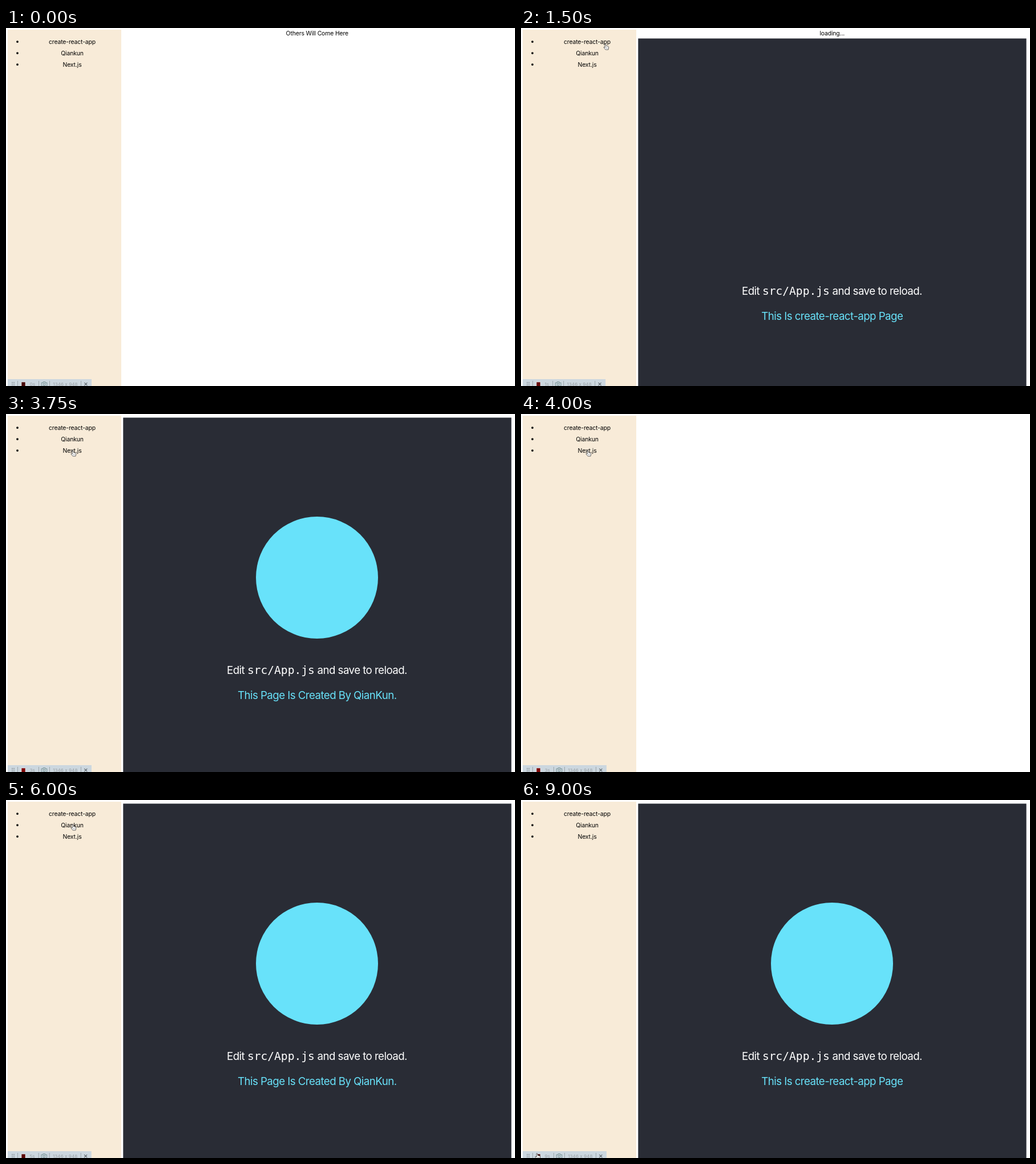
An HTML page that plays this animation: 892 by 628 pixels, repeating every 9250 ms.

```html
<!DOCTYPE html>
<html lang="en">
<head>
<meta charset="utf-8">
<title>Micro frontends</title>
<style>
  html, body { margin: 0; width: 100%; height: 100%; overflow: hidden; background: #fff; }
  svg { display: block; width: 892px; height: 628px; }
  text { font: 10.4px Inter, sans-serif; letter-spacing: -.012em; }
  .mid { text-anchor: middle; }
  .big { font-size: 18.7px; letter-spacing: -.55px; fill: #fff; }
  .code { font: 19.6px "DejaVu Sans Mono", monospace; letter-spacing: 0; }
  #link, #logo { fill: #68e2fa; }
  #bar text { font-size: 8.2px; letter-spacing: 0; fill: #9ba2a7; }
  .rule { stroke: #8f989e; stroke-width: .8; }
</style>
</head>
<body>
<svg viewBox="0 0 892 628">
  <rect x="3" y="3" width="199" height="625" fill="#f8ebd8"/>
  <g id="menu"></g>
  <text id="status" class="mid" x="545.3" y="13.3"></text>

  <g id="page">
    <rect x="205.3" y="6.4" width="680.3" height="630" fill="#292c35"/>
    <circle id="logo" cx="545" cy="287" r="107"/>
    <text class="big mid" x="545" y="456">Edit <tspan class="code">src/App.js</tspan> and save to reload.</text>
    <text id="link" class="big mid" x="545.2" y="499.6"></text>
  </g>

  <g id="bar">
    <rect id="back" x="3" y="616" width="147" height="12" fill="#ccd7df"/>
    <path d="M11 621v8M14 621v8" stroke="#777f85" stroke-width="1.4" stroke-dasharray="1.4 1.6"/>
    <path class="rule" d="M20.5 619v9"/>
    <rect id="rec" x="27" y="621" width="7" height="8" stroke="#eef1f3" stroke-width=".6"/>
    <text id="count" x="41.5" y="627.5">0s</text>
    <g id="tools">
      <path class="rule" d="M57.5 619v9M76.5 619v9M131.5 619v9"/>
      <g fill="none" stroke="#869fa3" stroke-width="1.2">
        <path d="M62.2 628v-5.6h2.3l1-1.7h3l1 1.7h2.3v5.6z"/>
        <circle cx="67" cy="625" r="1.9"/>
      </g>
      <text x="82.3" y="627.5">1346 x 948</text>
      <path d="M137.4 622.2l5 5m0-5l-5 5" stroke="#5d656b" stroke-width="1.2"/>
    </g>
  </g>

  <g id="hand">
    <path d="M-2-4.8q1-1 1.8.2L.3-1.4l3.3.6q1.2.3 1.1 1.6L4 5H-.8L-4 1.2q-.3-1.2 1-.9l1.4 1z"
      fill="#fff" stroke="#3a3a3a" stroke-width=".8" stroke-linejoin="round"/>
    <path d="M.5.8v2.4M2.2.9v2.3" stroke="#555" stroke-width=".5"/>
  </g>
</svg>
<script>
const LOOP = 9250, STEP = 250, TRAVEL = 1000;
const $ = id => document.getElementById(id);

$('menu').innerHTML = ['create-react-app', 'Qiankun', 'Next.js'].map((name, i) =>
  `<circle cx="20" cy="${24.1 + i * 20}" r="1.9"/>
   <text class="mid" x="116" y="${27.8 + i * 20}">${name}</text>`).join('');

const CRA = 'This Is create-react-app Page';
const QIANKUN = 'This Page Is Created By QianKun.';

// What the app shows from each time on; without a link the page is blank.
const scenes = [
  { from: 0, status: 'Others Will Come Here' },
  { from: 1000, status: 'loading...' },
  { from: 1500, status: 'loading...', link: CRA },
  { from: 1750, link: CRA },
  { from: 2750, link: QIANKUN },
  { from: 4000 },
  { from: 6000, link: QIANKUN },
  { from: 7250, link: CRA }
];

// The pointer rests at each stop and travels to it just before it arrives.
const stops = [
  { at: 0, x: 29, y: 625 },
  { at: 1000, x: 149, y: 33 },
  { at: 2500, x: 131, y: 54 },
  { at: 3750, x: 118, y: 69 },
  { at: 5750, x: 118, y: 48 },
  { at: 7000, x: 121, y: 31 },
  { at: 9000, x: 29, y: 625 }
];
const ease = p => p * p * (3 - 2 * p);

function pointer(t) {
  const i = stops.findLastIndex(s => s.at <= t);
  const a = stops[i], b = stops[i + 1] || a;
  const p = ease(Math.max(0, 1 - (b.at - t) / TRAVEL));
  return [a.x + (b.x - a.x) * p, a.y + (b.y - a.y) * p];
}

const digitWidth = () => $('count').getComputedTextLength();
const zeroWidth = digitWidth();
const move = (id, x, y) => $(id).setAttribute('transform', `translate(${x} ${y})`);

function drawApp(t) {
  const { status = '', link = '' } = scenes.findLast(s => s.from <= t);
  $('status').textContent = status;
  $('link').textContent = link;
  $('page').style.display = link ? '' : 'none';
  $('logo').style.display = status ? 'none' : '';
  move('page', 0, status ? 12 : 0);
}

function drawBar(t) {
  // The recorder's clock runs slightly fast after a late start.
  $('count').textContent = Math.max(0, Math.floor(t * .00102 - .15)) + 's';
  const dx = digitWidth() - zeroWidth;
  move('tools', dx, 0);
  $('back').setAttribute('width', 147 + dx);
  const red = 95 + 35 * Math.cos((t - 3500) / LOOP * 2 * Math.PI);
  $('rec').setAttribute('fill', `rgb(${red} 8 8)`);
}

function draw(t) {
  drawApp(t);
  drawBar(t);
  $('hand').style.display = t ? '' : 'none';
  move('hand', ...pointer(t));
}

let last = -1;
function tick() {
  const t = Math.floor(performance.now() % LOOP / STEP) * STEP;
  if (t !== last) draw(last = t);
  requestAnimationFrame(tick);
}
tick();
</script>
</body>
</html>
```
